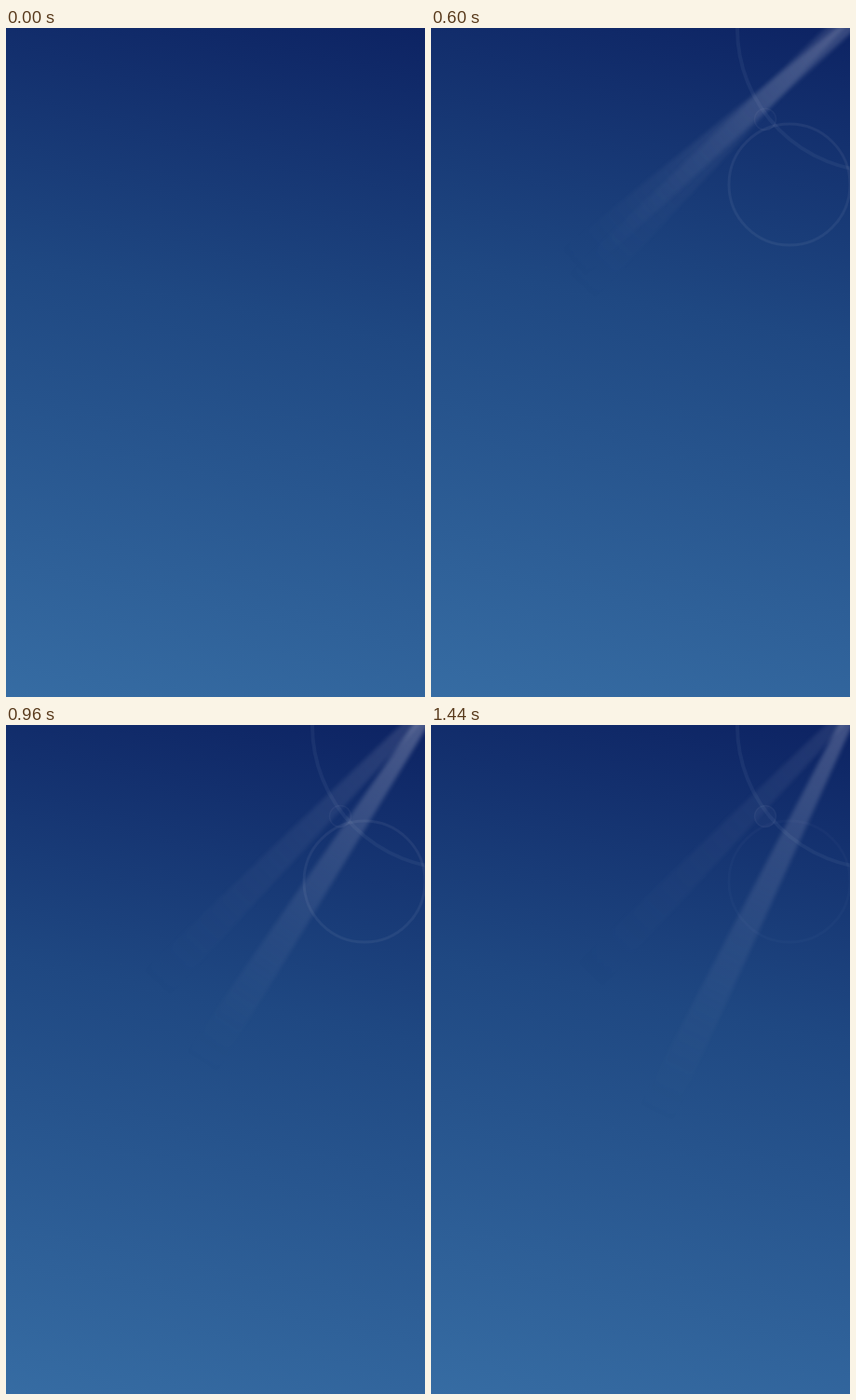
Write an HTML page with a canvas that moves like this. It is 450x718 px and loops after 1.72 s.

```html
<!DOCTYPE html>
<html lang="en">
<head>
<meta charset="utf-8">
<title>Sunbeams</title>
<style>
html, body { margin: 0; width: 100%; height: 100%; overflow: hidden; background: #1d457d; }
canvas { display: block; }
</style>
</head>
<body>
<canvas id="stage" width="450" height="718"></canvas>
<script>
const W = 450, H = 718;
const LOOP = 1720, STEP = 40, START = 120, SWEEP_END = 1240, END = 1440;
const ctx = document.getElementById('stage').getContext('2d');
const white = alpha => `rgba(205, 208, 225, ${alpha})`;
const ramp = (t, from, to) => Math.min(1, Math.max(0, (t - from) / (to - from)));

const sky = ctx.createLinearGradient(450, 0, 295, 777);
sky.addColorStop(0, 'rgb(13, 35, 99)');
sky.addColorStop(.42, 'rgb(31, 72, 130)');
sky.addColorStop(1, 'rgb(54, 108, 163)');

// Tapered beam that fades along its length; angle is measured down from pointing left
function beam(x, y, degrees, length, alpha) {
  const light = ctx.createLinearGradient(0, 0, length, 0);
  for (let u = 0; u <= 1; u += .125) {
    light.addColorStop(u, white(alpha * (1 - u) ** 1.5));
  }
  ctx.save();
  ctx.translate(x, y);
  ctx.rotate(Math.PI - degrees * Math.PI / 180);
  ctx.filter = 'blur(2px)';
  ctx.fillStyle = light;
  ctx.beginPath();
  ctx.moveTo(-30, -6);
  ctx.lineTo(length, -20);
  ctx.lineTo(length, 20);
  ctx.lineTo(-30, 6);
  ctx.fill();
  ctx.restore();
}

function circle(x, y, r, width, line, fill = 0) {
  ctx.beginPath();
  ctx.arc(x, y, r, 0, Math.PI * 2);
  ctx.fillStyle = white(fill);
  ctx.fill();
  ctx.strokeStyle = white(line);
  ctx.lineWidth = width;
  ctx.stroke();
}

function draw(t) {
  ctx.fillStyle = sky;
  ctx.fillRect(0, 0, W, H);
  if (t < START) return;

  const p = ramp(t, START, SWEEP_END);
  const appear = ramp(t, START, 280);
  const dim = 1 - .3 * ramp(t, SWEEP_END, END);

  beam(434, 0, 45.5, 400, .15 * appear * dim);
  beam(444, 2, 6 + 98 * p - 40 * p * p, 340 + 130 * p, (.1 + .28 * p) * appear * dim);

  circle(482, 1, 142 + 11 * ramp(t, START, 480), 4, .06 * appear);
  circle(385, 168, 65, 3, .07 * ramp(t, 400, 600) - .045 * ramp(t, 960, 1160));
  const pulse = Math.cos((t - 760) / 400 * Math.PI * 2);
  circle(359, 98, 11.5, 1.5, .06 * appear, (.05 + .04 * pulse) * appear);
}

function frame() {
  const t = performance.now() % LOOP;
  draw(Math.min(Math.floor(t / STEP) * STEP, END));
  requestAnimationFrame(frame);
}
frame();
</script>
</body>
</html>
```
